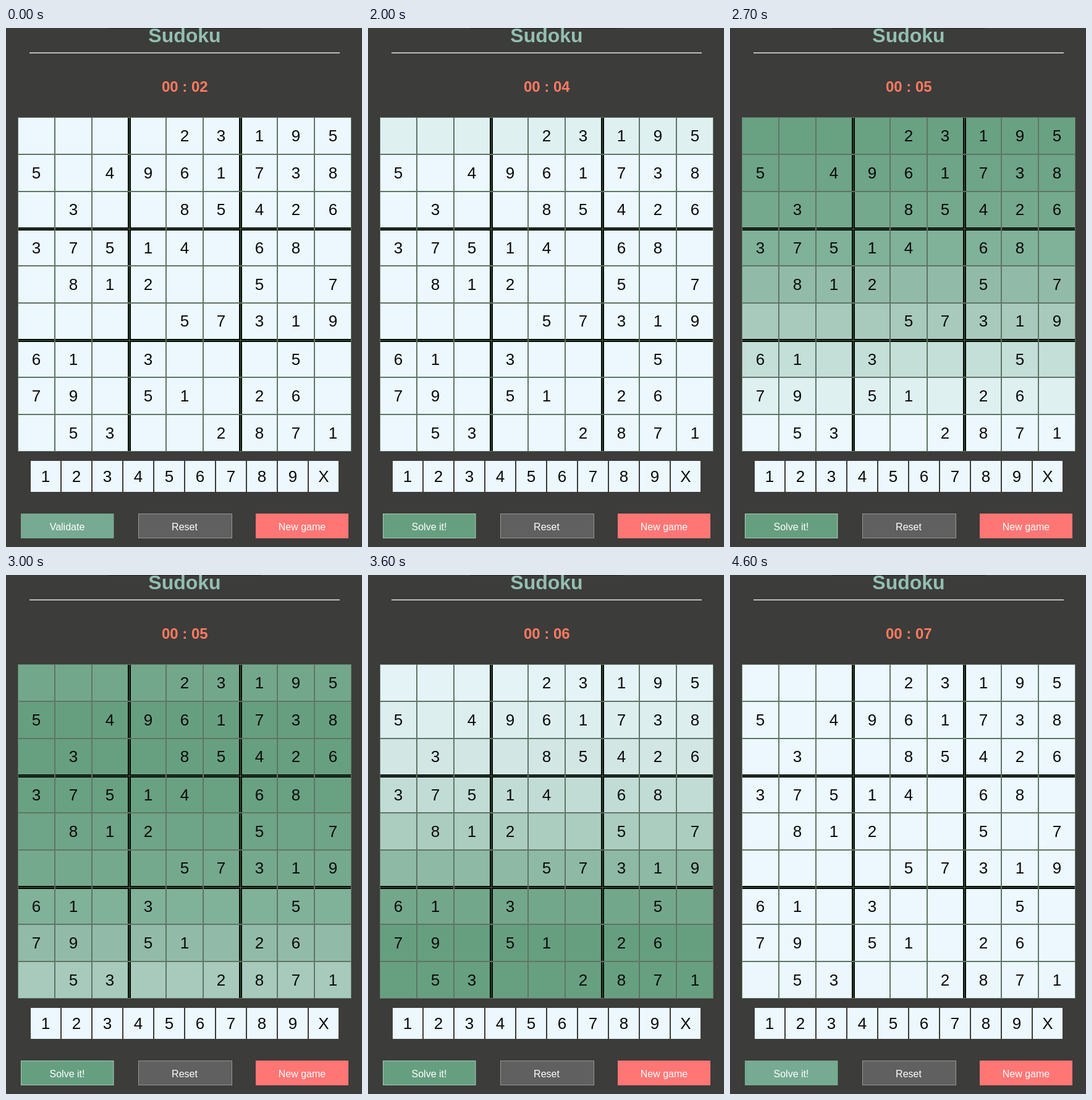
An HTML page that plays this animation: 576x838 px, repeating every 5000 ms.

```html
<!DOCTYPE html>
<html lang="en">
<head>
<meta charset="utf-8">
<title>Sudoku</title>
<style>
  html, body { margin: 0; width: 100%; height: 100%; overflow: hidden; background: #3c3c3a; }
  svg { display: block; }
  text { font-family: "Liberation Sans", Arial, sans-serif; text-anchor: middle; }
  .digit { font-size: 26px; fill: #0a0a0a; }
  .label { font-size: 16px; fill: #fff; }
  .title { font-size: 32px; font-weight: bold; fill: #93bfb2; }
  .timer { font-size: 24px; font-weight: bold; fill: #ff7b61; }
</style>
</head>
<body>
<svg id="stage" width="576" height="838" viewBox="0 0 576 838"></svg>
<script>
const LOOP = 5000, STEP = 100;
const PALE = [236, 248, 253], GREEN = [102, 159, 128], SOFT = [118, 170, 146];
const LINE = '#5f7566';
const PUZZLE = [
  '....23195', '5.4961738', '.3..85426',
  '37514.68.', '.812..5.7', '....57319',
  '61.3...5.', '79.51.26.', '.53..2871'
];
const stage = document.getElementById('stage');

function add(tag, attrs, content = '') {
  const el = document.createElementNS('http://www.w3.org/2000/svg', tag);
  for (const key in attrs) el.setAttribute(key, attrs[key]);
  el.textContent = content;
  return stage.appendChild(el);
}
const rect = (x, y, width, height, fill, stroke = 'none') =>
  add('rect', { x, y, width, height, fill, stroke });
const text = (x, y, cls, content) => add('text', { x, y, class: cls }, content);

const clamp = v => Math.min(1, Math.max(0, v));
const rgb = c => `rgb(${c.map(Math.round)})`;
const mix = (a, b, k) => rgb(a.map((v, i) => v + (b[i] - v) * k));

// CSS "ease": cubic-bezier(.25, .1, .25, 1)
function ease(x) {
  const curve = (a, b, s) => 3 * a * s * (1 - s) ** 2 + 3 * b * s * s * (1 - s) + s ** 3;
  let lo = 0, hi = 1;
  for (let i = 0; i < 20; i++) {
    const mid = (lo + hi) / 2;
    if (curve(.25, .25, mid) < x) lo = mid; else hi = mid;
  }
  return curve(.1, 1, (lo + hi) / 2);
}

// Header
rect(165, 0, 248, 1, '#262625');
text(289, 23, 'title', 'Sudoku');
rect(38, 39.5, 502, 1.5, '#dde9df');
const timer = text(289.3, 103, 'timer');

// Board
const rows = PUZZLE.map((_, r) => rect(19, 144 + 60 * r, 540, 60, rgb(PALE)));
for (const i of [3, 6]) {
  rect(17 + 60 * i, 145, 5, 538, '#050805');
  rect(20, 142 + 60 * i, 538, 5, '#050805');
}
for (let i = 1; i < 9; i++) {
  const thick = i % 3 === 0, w = thick ? 1 : 2, d = thick ? 0 : 1;
  const color = thick ? '#3f6645' : LINE;
  rect(19 + 60 * i - d, 145, w, 538, color);
  rect(20, 144 + 60 * i - d, 538, w, color);
}
rect(19.5, 144.5, 539, 539, 'none', LINE);

const nudge = i => i === 3 || i === 6 ? 1 : i === 2 || i === 5 ? -1 : 0;
PUZZLE.forEach((row, r) => [...row].forEach((digit, c) => {
  if (digit !== '.')
    text(49 + 60 * c + nudge(c), 183 + 60 * r + nudge(r), 'digit', digit);
}));

// Number pad
[...'123456789X'].forEach((key, i) => {
  rect(40 + 50 * i, 699, 48, 50, rgb(PALE));
  text(64 + 50 * i, 733, 'digit', key);
});

// Buttons
const action = rect(24.5, 784.5, 149.5, 39, rgb(SOFT));
const actionLabel = text(99, 811, 'label');
rect(214.5, 784.5, 151, 39, '#606060', '#969696');
text(289, 811, 'label', 'Reset');
rect(404, 784, 150, 40, '#ff7675');
text(479, 811, 'label', 'New game');

function draw(t) {
  const ticks = [100, 1200, 2200, 3200, 4200].filter(s => t >= s).length;
  timer.textContent = `00 : 0${2 + ticks}`;
  actionLabel.textContent = t < 1900 ? 'Validate' : 'Solve it!';

  const hover = ease(clamp((t - 500) / 400)) - ease(clamp((t - 3800) / 400));
  action.setAttribute('fill', mix(SOFT, GREEN, hover));
  action.setAttribute('stroke', mix(SOFT, [166, 205, 184], hover));

  rows.forEach((row, r) => {
    const age = (t - 1900 - 100 * r) / 1000;
    const level = ease(clamp(age)) - ease(clamp(age - 1));
    row.setAttribute('fill', mix(PALE, GREEN, level));
  });
}

function frame() {
  const t = performance.now() % LOOP;
  draw(Math.floor(t / STEP) * STEP);
  requestAnimationFrame(frame);
}
frame();
</script>
</body>
</html>
```
